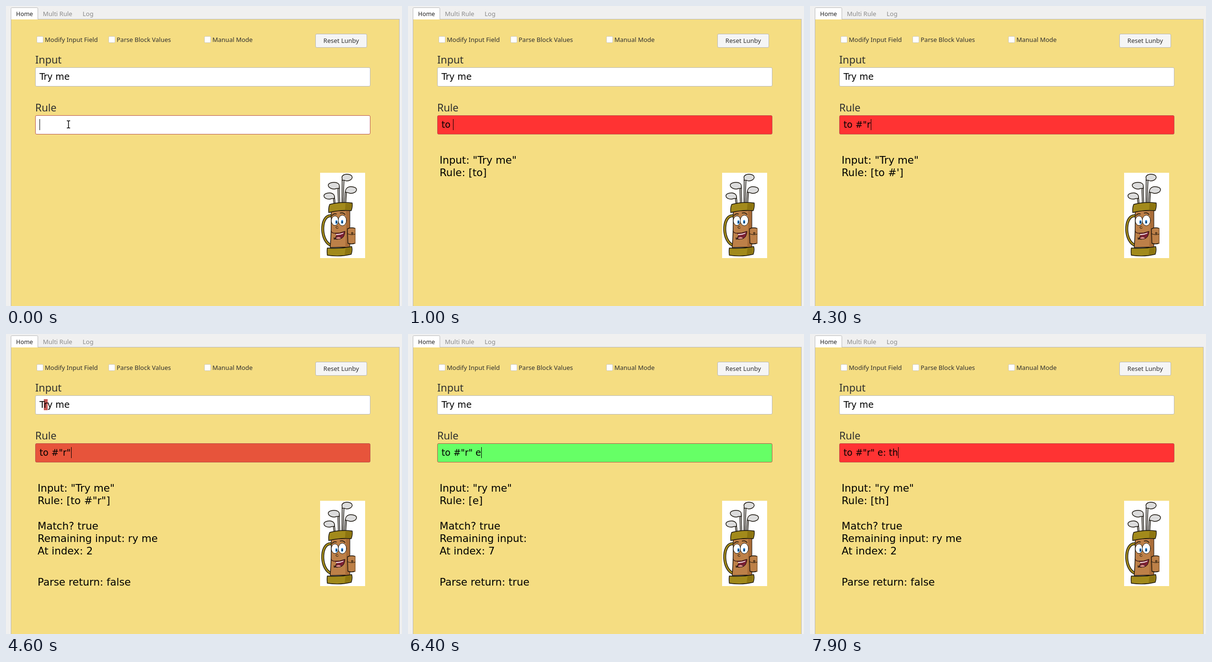
These frames come from a looping animation (827 px wide and 626 px high, 8 s). An HTML page:

```html
<!DOCTYPE html>
<html lang="en">
<head>
<meta charset="utf-8">
<title>Rule tester</title>
<style>
  html, body { margin: 0; width: 100%; height: 100%; overflow: hidden; background: #f0f0f0; }
  svg { display: block; }
  text { white-space: pre; }
  .ui { font: 13px "Noto Sans", "Open Sans", sans-serif; fill: #303030; }
  .dim { fill: #8a8a8a; }
  .heading { font-size: 21.6px; }
  .field { font: 18.67px "DejaVu Sans", sans-serif; }
  .out { font: 21.33px "DejaVu Sans", sans-serif; }
  .box { fill: #fff; stroke: #b8b8b8; }
  .check rect { fill: #fff; stroke: #ccc8bc; }
  .art { stroke: #17120a; stroke-width: 1.4; stroke-linejoin: round; stroke-linecap: round; }
</style>
</head>
<body>
<svg width="827" height="626" viewBox="0 0 827 626">
  <rect width="827" height="626" fill="#f0f0f0"/>
  <rect x="10.5" y="27.5" width="811" height="610" fill="#f5dd82" stroke="#b9b9b9"/>
  <path d="M10.5 28V5.500q0-2 2-2H64.500q2 0 2 2V28" fill="#fff" stroke="#b9b9b9"/>
  <g class="ui">
    <text x="21" y="21" font-size="12.5" style="font-size:12.4px;fill:#222">Home</text>
    <text class="dim" x="77" y="21">Multi Rule</text>
    <text class="dim" x="160" y="21">Log</text>
    <g class="check">
      <rect x="64.500" y="63.500" width="13" height="13" rx="2"/>
      <rect x="214.500" y="63.500" width="13" height="13" rx="2"/>
      <rect x="414.500" y="63.500" width="13" height="13" rx="2"/>
    </g>
    <text x="81" y="75">Modify Input Field</text>
    <text x="231" y="75">Parse Block Values</text>
    <text x="431" y="75">Manual Mode</text>
    <rect x="646.500" y="58.500" width="107" height="28" rx="2.500" fill="#f5f5f5" stroke="#b8b8b8"/>
    <text x="700" y="77" text-anchor="middle">Reset Lunby</text>
    <text class="heading" x="61" y="120">Input</text>
    <text class="heading" x="61" y="220">Rule</text>
  </g>

  <rect class="box" x="61.500" y="128.500" width="699" height="39" rx="2.500"/>
  <rect id="selection" x="79" y="136" width="8" height="23" fill="#c45a56"/>
  <text class="field" x="70" y="154">Try me</text>

  <rect id="ruleBox" x="61.500" y="228.500" width="699" height="39" rx="2.500" stroke="#b9544c"/>
  <text id="typed" class="field" x="70" y="254"></text>
  <rect id="caret" y="236" width="1" height="23"/>
  <g id="pointer" fill="none">
    <path id="beam" d="M127 239.500h2.500l1 1 1-1h2.500M130.500 240v14M127 254.500h2.500l1-1 1 1h2.500" stroke="#fff" stroke-width="3.500"/>
    <use href="#beam" style="stroke:#000"/>
    <path d="M127 239.500h2.500l1 1 1-1h2.500M130.500 240v14M127 254.500h2.500l1-1 1 1h2.500" stroke="#000" stroke-width="1.500"/>
  </g>

  <g class="out" id="lines"></g>

  <rect x="656" y="348" width="94" height="178" fill="#fff"/>
  <g class="art">
    <g fill="#dcdcdc">
      <path d="M701.500 412L702 362l3-3 1 2-2 51zM694 412L693 379l3-2 1 35zM706.500 412l2-24 3-2-2 26zM685 413l-2-14 3-1 1.500 15z"/>
      <path d="M702 360c-2-5 3-9 10-9 7 0 11 3 11 6 0 5-6 8-11 8-4 0-6-3-10-1z"/>
      <path d="M696 377c1-6-4-9-11-9-8 0-12 3-12 6 0 5 7 8 12 8 5 0 7-3 11-1z"/>
      <path d="M709 389c-1-7 4-12 11-12 8 0 12 3 12 6 0 5-6 8-12 8-4 0-7-3-11-2z"/>
      <path d="M686 400c1-6-4-10-10-10-8 0-12 3-12 6 0 5 6 7 11 7 5 0 7-3 11-1z"/>
    </g>
    <path d="M680 438C657 434 655 486 676 498" fill="none" stroke-width="6"/>
    <path d="M680 438C657 434 655 486 676 498" fill="none" stroke="#a28a1b" stroke-width="3.400"/>
    <path d="M679 428L718 426V503L677 504Q680 466 679 428z" fill="#bd8048"/>
    <path d="M710 428h7.500v74l-9 1q3-38 1.500-75z" fill="#a96c38" stroke="none"/>
    <path d="M713 465q8-4 16-1v31q-8 3-15 0z" fill="#bd8048"/>
    <path d="M729 464v32" stroke="#bd8048"/>
    <path d="M713 475q8 4 16 1" fill="none" stroke-width="1"/>
    <circle cx="723" cy="474" r="1.700" fill="#a96c38" stroke-width="1"/>
    <path d="M676 414Q698 408 723 411Q724 419 721 427Q698 425 674 431Q673 421 676 414z" fill="#a28a1b"/>
    <path d="M671 505Q698 507 722 502Q724 510 721 518Q698 524 671 520Q670 512 671 505z" fill="#a28a1b"/>
    <path d="M709 412l13 0-2 14-12-1zM709 506l12-3-1 14-13 3z" fill="#8d7510" stroke="none"/>
    <g stroke-width="1">
      <ellipse cx="687" cy="448" rx="7.500" ry="10" fill="#fff"/>
      <ellipse cx="702.500" cy="447.500" rx="8.500" ry="11" fill="#fff"/>
      <path d="M681 437q4-5 9-3M698 432q6-2 10 3" fill="none" stroke-width="1.500"/>
      <ellipse cx="690" cy="451" rx="2.200" ry="4" fill="#2d83d2" stroke="none"/>
      <ellipse cx="702" cy="450.500" rx="2.300" ry="4" fill="#2d83d2" stroke="none"/>
      <circle cx="690.500" cy="451" r="1.200" stroke="none"/>
      <circle cx="702" cy="451" r="1.200" stroke="none"/>
      <path d="M693 460q-4-1-4 2 1 4 5 1" fill="none"/>
      <path d="M680 470q14 7 30-1-2 16-15 18-7 1-9-4l7-4q-7-2-13-9z" fill="#bd8048" stroke="none"/>
      <path d="M679 470q2 4 5 4 13 1 24-4-1 14-10 16-7 2-12 0l5-8" fill="#7d2034"/>
      <path d="M689 476q9 0 16-3l-1 2q-7 3-14 3z" fill="#fff" stroke="none"/>
      <path d="M688 485q5-6 11-2l1 2q-6 3-12 0z" fill="#e58f8b" stroke-width=".7"/>
      <path d="M685 483v4l3-1" fill="none"/>
    </g>
  </g>
</svg>
<script>
const LOOP = 8000;
const WHITE = [255, 255, 255], RED = [255, 51, 51], GREEN = [102, 255, 102];
const $ = id => document.getElementById(id);

const lines = [329, 355, 408, 434, 460, 525].map(y => {
  const line = document.createElementNS("http://www.w3.org/2000/svg", "text");
  line.setAttribute("x", 66);
  line.setAttribute("y", y);
  return $("lines").appendChild(line);
});

const report = (input, rule, rest, index, result) => {
  const head = [`Input: "${input}"`, `Rule: [${rule}]`];
  return index === undefined ? head : head.concat(
    "Match? true", `Remaining input: ${rest}`, `At index: ${index}`, `Parse return: ${result}`);
};
const unmatched = rule => report("Try me", rule);
const matched = rule => report("ry me", rule, "ry me", 2, false);

// Each key press: start time, field text, caret x, report, selection shown
const keys = [
  [0, "", 70, []],
  [400, "t", 77, unmatched("t")],
  [700, "to", 88, unmatched("to")],
  [1000, "to ", 94, unmatched("to")],
  [1600, "to #", 110, unmatched("to #")],
  [2100, "to #'", 115, unmatched("to #'")],
  [3000, "to #", 110, unmatched("to #'")],
  [3500, 'to #"', 119, unmatched("to #'")],
  [4300, 'to #"r', 127, unmatched("to #'")],
  [4600, 'to #"r"', 136, report("Try me", 'to #"r"', "ry me", 2, false), true],
  [6100, 'to #"r" ', 142, report("Try me", 'to #"r"', "ry me", 2, false), true],
  [6400, 'to #"r" e', 153, report("ry me", "e", "", 7, true)],
  [6800, 'to #"r" e:', 159, matched("e:"), true],
  [7500, 'to #"r" e: ', 165, matched("e:"), true],
  [7700, 'to #"r" e: t', 172, matched("t")],
  [7900, 'to #"r" e: th', 184, matched("th")]
];
// The "#" press leaves the report as it was
keys[4][3] = keys[3][3];

const fades = [[400, WHITE, RED], [4600, RED, GREEN], [7700, GREEN, RED]];
const fadeSteps = [0.16, 0.66, 1];

const latest = (list, t) => list.filter(item => item[0] <= t).pop();
const show = (id, on) => $(id).setAttribute("visibility", on ? "visible" : "hidden");

function fieldColor(t) {
  const fade = latest(fades, t);
  if (!fade) return WHITE;
  const [start, from, to] = fade;
  const k = fadeSteps[Math.min(2, Math.floor((t - start) / 100))];
  return from.map((c, i) => Math.round(c + (to[i] - c) * k));
}

let shown;
function draw() {
  const t = performance.now() % LOOP;
  const key = latest(keys, t);
  if (key !== shown) {
    shown = key;
    const [, text, x, rows, selected] = key;
    $("typed").textContent = text;
    $("caret").setAttribute("x", x);
    lines.forEach((line, i) => line.textContent = rows[i] || "");
    show("selection", selected);
  }
  show("pointer", t < 400);
  show("caret", t < 5800 || t >= 6100);
  $("ruleBox").setAttribute("fill", `rgb(${fieldColor(t)})`);
  requestAnimationFrame(draw);
}
draw();
</script>
</body>
</html>
```
